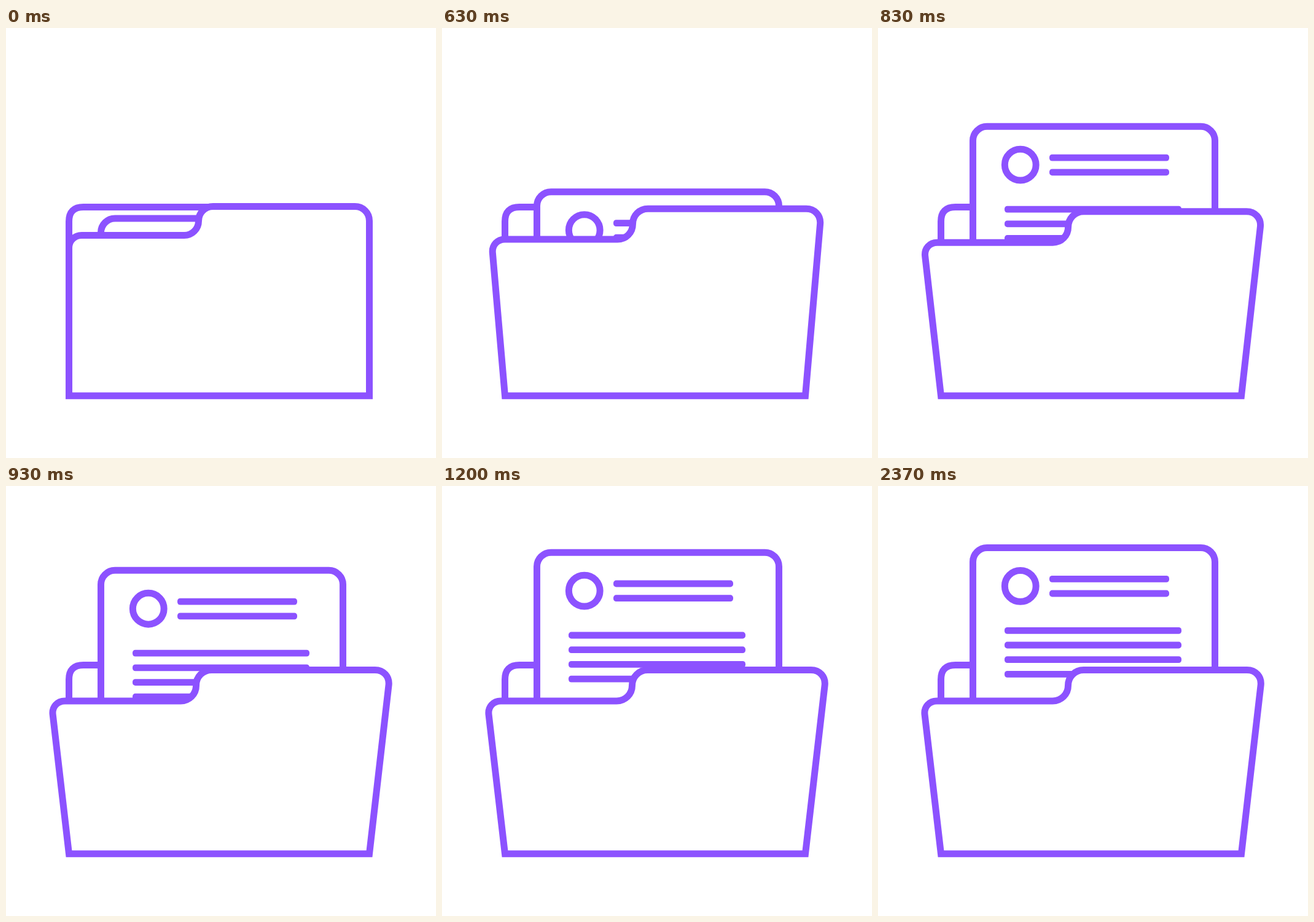
Animation, 700 px wide and 700 px high, one loop 2.4 s. Source, as an HTML page:

```html
<!DOCTYPE html>
<html lang="en">
<head>
<meta charset="utf-8">
<title>Folder</title>
<style>
  html, body { margin: 0; width: 100%; height: 100%; overflow: hidden; background: #fff; }
  svg { display: block; width: 100%; height: 100%; }
  .line { fill: #fff; stroke: #8c52ff; stroke-width: 11; stroke-miterlimit: 10; }
  .bar { fill: #8c52ff; }
</style>
</head>
<body>
<svg viewBox="0 0 700 700">
  <path class="line" d="M102.5 590V315Q102.5 291.5 126 291.5H332" style="fill:none"/>
  <g id="paper">
    <path class="line" d="M154.5 280V23A23 23 0 0 1 177.5 0H525.5A23 23 0 0 1 548.5 23V280"/>
    <circle class="line" cx="231.75" cy="62.4" r="25.4"/>
  </g>
  <path class="line" id="front"/>
</svg>
<script>
const LOOP = 2400, FPS = 30;
const START = 14, OPENED = 30, RISEN = 45;
const paper = document.getElementById('paper');
const front = document.getElementById('front');

const mix = (a, b, k) => a + (b - a) * k;

// Cubic bezier easing (.3, 0, .025, 1), solved by bisection.
function ease(x) {
  if (x <= 0) return 0;
  if (x >= 1) return 1;
  let lo = 0, hi = 1;
  for (let i = 0; i < 24; i++) {
    const s = (lo + hi) / 2, r = 1 - s;
    if (.9 * r * r * s + .075 * r * s * s + s * s * s < x) lo = s;
    else hi = s;
  }
  return lo * lo * (3 - 2 * lo);
}

const progress = (step, end) => ease((step - START) / (end - START));

function toward([x, y], [tx, ty], dist) {
  const k = dist / Math.hypot(tx - x, ty - y);
  return [mix(x, tx, k), mix(y, ty, k)];
}

// Rounds every inner vertex of an outline by its radius.
function rounded(points, radii) {
  const corners = radii.map((r, i) => {
    const [before, p, after] = points.slice(i, i + 3);
    const grip = r * .44;
    return `L${toward(p, before, r)}C${toward(p, before, grip)} `
      + `${toward(p, after, grip)} ${toward(p, after, r)}`;
  });
  return `M${points[0]}${corners.join('')}L${points[points.length - 1]}Z`;
}

// The front tips forward: it widens early and drops late.
function frontPath(a) {
  const spread = a * (3 - a) / 2;
  const left = mix(102.5, 73.5, spread);
  const right = mix(591.5, 626, spread);
  const fold = mix(313.5, 309.5, spread);
  const tab = mix(337.5, 350, a ** 1.5);
  const top = mix(290.5, 299.5, a * a);
  const base = 598.75, r = (tab - top) / 2;
  return rounded(
    [[102.5, base], [left, tab], [fold, tab], [fold, top], [right, top], [591.5, base]],
    [r - 3, r, r, r]
  );
}

function addBars(count, x, y, width) {
  for (let i = 0; i < count; i++) {
    const bar = document.createElementNS('http://www.w3.org/2000/svg', 'rect');
    const attrs = { class: 'bar', x, y: y + 23.7 * i - 5.4, width, height: 10.8, rx: 4.5 };
    for (const name in attrs) bar.setAttribute(name, attrs[name]);
    paper.appendChild(bar);
  }
}

function draw(ms) {
  const step = Math.floor((ms % LOOP + 4) * FPS / 1000);
  const y = mix(310, 100.5, progress(step, RISEN));
  paper.setAttribute('transform', `translate(0 ${y})`);
  front.setAttribute('d', frontPath(progress(step, OPENED)));
}

addBars(2, 279, 50.8, 195);
addBars(4, 206, 134.8, 288);

const start = performance.now();
function tick() {
  draw(performance.now() - start);
  requestAnimationFrame(tick);
}
draw(0);
requestAnimationFrame(tick);
</script>
</body>
</html>
```
